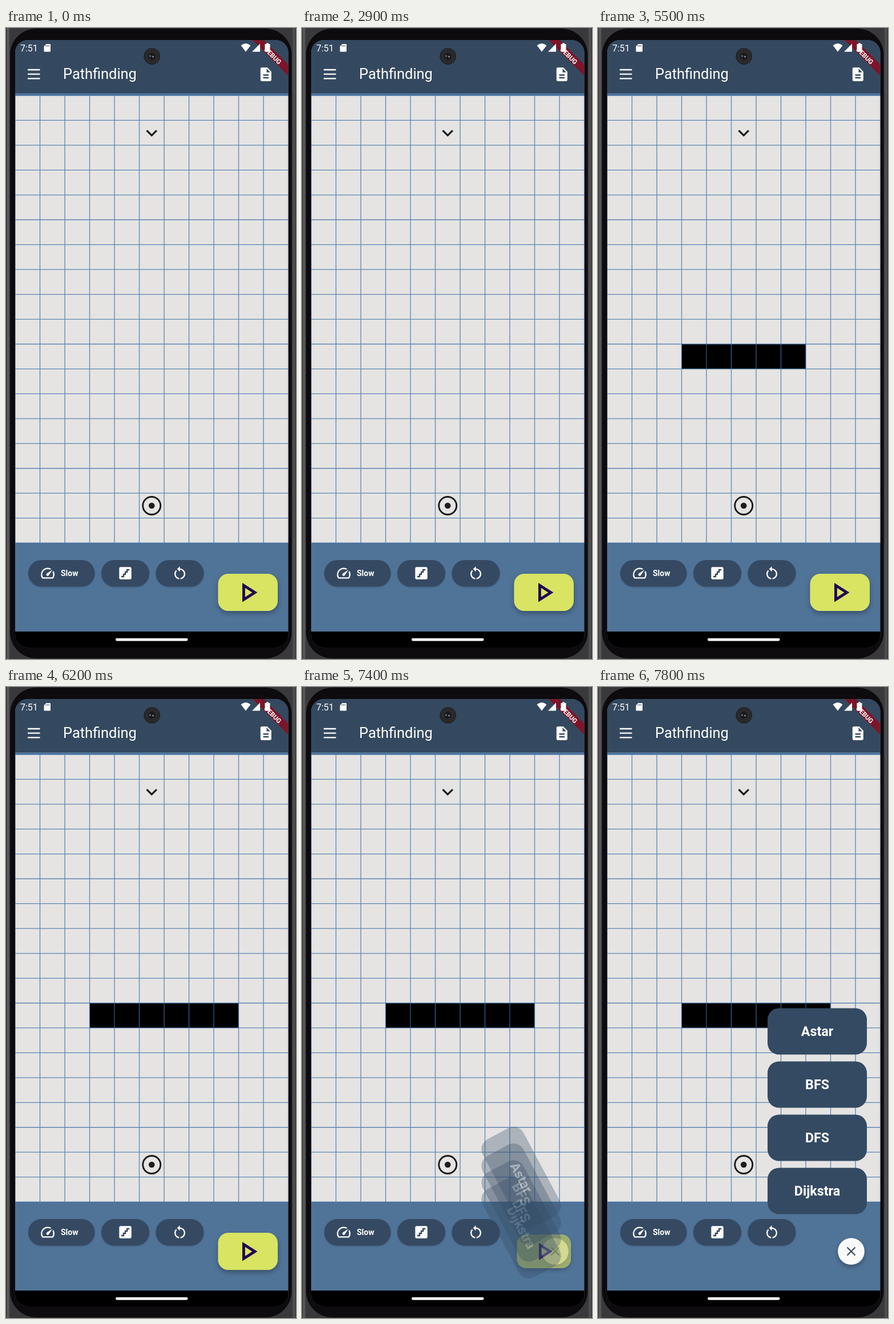
Write an HTML page that moves like this. It is 508 px wide and 1103 px high and loops after 8 s.

```html
<!DOCTYPE html>
<html lang="en">
<head>
<meta charset="utf-8">
<title>Pathfinding</title>
<style>
  html, body { margin: 0; width: 100%; height: 100%; overflow: hidden; background: #0d0b0d; }
  svg { display: block; width: 100%; height: 100%; font-family: Roboto, sans-serif; }
  .pill { fill: #344a62; }
  .bold { font-weight: 700; fill: #fff; }
</style>
</head>
<body>
<svg viewBox="0 0 508 1103">
  <defs>
    <linearGradient id="edge">
      <stop offset="0" stop-color="#2c2c2e"/>
      <stop offset=".006" stop-color="#636365"/>
      <stop offset=".014" stop-color="#39393b"/>
      <stop offset=".986" stop-color="#39393b"/>
      <stop offset=".994" stop-color="#58585a"/>
      <stop offset="1" stop-color="#2c2c2e"/>
    </linearGradient>
    <filter id="soft" x="-30%" y="-30%" width="160%" height="180%">
      <feDropShadow dx="0" dy="4" stdDeviation="4" flood-color="#000" flood-opacity=".3"/>
    </filter>
    <filter id="low" x="-20%" y="-20%" width="140%" height="150%">
      <feDropShadow dx="0" dy="1" stdDeviation="1" flood-color="#000" flood-opacity=".25"/>
    </filter>
    <clipPath id="screen"><rect x="16" y="21" width="478.5" height="1062" rx="22"/></clipPath>
  </defs>

  <rect width="508" height="1103" fill="url(#edge)"/>
  <rect x="7" y="1" width="493.5" height="1101" rx="46" fill="#0d0b0d"/>

  <g clip-path="url(#screen)">
    <rect x="16" y="21" width="479" height="1062" fill="#507398"/>
    <rect x="16" y="21" width="479" height="92.5" fill="#34495f"/>
    <rect x="16" y="112.5" width="479" height="1.5" fill="#2f4560"/>
    <rect x="16" y="118" width="479" height="782" fill="#e5e4e3"/>
    <g id="walls"></g>
    <path id="grid" fill="none" stroke="#3c6ea5" stroke-opacity=".8" stroke-width="1.3"/>
    <rect x="16" y="1055" width="479" height="28"/>
    <path d="M432 21h19.500L494.500 64v19.500z" fill="#7c1529"/>
    <text class="bold" font-size="11.500" text-anchor="middle" transform="translate(467.500 48.500) rotate(45)" y="4">DEBUG</text>
  </g>
  <rect x="192" y="1066.800" width="126.500" height="4.600" rx="2.300" fill="#fff"/>

  <g fill="#fff">
    <text x="25" y="41" font-size="16">7:51</text>
    <path d="M70.500 28H77q1 0 1 1V40.500q0 1-1 1H67.500q-1 0-1-1V32z"/>
    <path d="M411.500 30.500q8.500-7 17 0L420 41.500zM431 41.500L445 27.500V41.500z"/>
    <path d="M456 26.500h4v1.500h2.500v13.500h-9V28h2.500z"/>
    <path d="M38 73h21.500M38 80.700h21.500M38 88.400h21.500" stroke="#fff" stroke-width="2.300"/>
    <text x="100" y="89" font-size="25.400">Pathfinding</text>
  </g>
  <path d="M70 29.800v3M72.600 29.800v3M75.200 29.800v3" stroke="#34495f"/>

  <circle cx="255.700" cy="49.500" r="14" fill="#29292b" stroke="#1b1c20"/>
  <circle cx="255.700" cy="49.500" r="6" fill="#17181b"/>
  <circle cx="252.500" cy="49" r="1.700" fill="#62666c"/>
  <circle cx="257.500" cy="50" r="1.600" fill="#8a8e94"/>

  <circle cx="255.200" cy="835" r="15.500" fill="none" stroke="#1b1b1b" stroke-width="2.900"/>
  <circle cx="255.200" cy="835" r="5.300" fill="#1b1b1b"/>

  <g filter="url(#low)">
    <rect class="pill" x="39" y="930" width="116.500" height="46.500" rx="23"/>
    <rect class="pill" x="167" y="930" width="84" height="46.500" rx="23"/>
    <rect class="pill" x="262.500" y="930" width="84" height="46.500" rx="23"/>
  </g>
  <text class="bold" x="96" y="958" font-size="14">Slow</text>
  <g id="icons"></g>

  <g id="close" filter="url(#soft)">
    <circle cx="443.500" cy="986.500" r="23.300" fill="#fafafa"/>
    <path d="M436.500 979.500l14 14m0-14l-14 14" stroke="#34495f" stroke-width="2.200"/>
  </g>
  <g id="fab">
    <rect x="371.500" y="954" width="104.500" height="65" rx="18" fill="#d9e462" filter="url(#soft)"/>
    <rect id="press" x="371.500" y="954" width="104.500" height="65" rx="18" fill="#30305c"/>
    <path d="M10 8.640L15.270 12 10 15.360V8.640M8 5v14l11-7L8 5z" fill="#1f0053" transform="translate(394.800 958) scale(2.400)"/>
  </g>
  <g id="menu"></g>
</svg>
<script>
const LOOP = 8000, STEP = 100;
const LEFT = 16, TOP = 118, COLS = 11, ROWS = 18, CW = 43.5, CH = 43.45;
const WALL_ROW = 10, WALL_COL = 3;
const WALL_TIMES = [3100, 3700, 4300, 4900, 5500, 6200];
const OPEN_AT = 7330, OPEN_MS = 250, GAP = 93;

const $ = id => document.getElementById(id);
function add(parent, tag, attrs, text = '') {
  const el = document.createElementNS('http://www.w3.org/2000/svg', tag);
  for (const key in attrs) el.setAttribute(key, attrs[key]);
  el.textContent = text;
  return parent.appendChild(el);
}
const show = (el, on) => el.setAttribute('visibility', on ? 'visible' : 'hidden');

let lines = '';
for (let c = 0; c <= COLS; c++) lines += `M${LEFT + c * CW} ${TOP}v${ROWS * CH}`;
for (let r = 0; r <= ROWS; r++) lines += `M${LEFT} ${TOP + r * CH}h${COLS * CW}`;
$('grid').setAttribute('d', lines);

const walls = WALL_TIMES.map((_, i) => add($('walls'), 'rect', {
  x: LEFT + (WALL_COL + i) * CW, y: TOP + WALL_ROW * CH, width: CW, height: CH
}));

// 24-unit icons placed by their centre
function icon(x, y, scale, fill, d) {
  add($('icons'), 'path', { d, fill, transform: `translate(${x} ${y}) scale(${scale}) translate(-12 -12)` });
}
icon(455.3, 81, 1.19, '#fff', 'M14 2H6c-1.1 0-2 .9-2 2v16c0 1.1.9 2 2 2h12c1.1 0 2-.9 2-2V8l-6-6zm2 16H8v-2h8v2zm0-4H8v-2h8v2zm-3-5V3.500L18.500 9H13z');
icon(255.2, 183.5, 1.64, '#1b1b1b', 'M16.590 8.590L12 13.170 7.410 8.590 6 10l6 6 6-6z');
icon(73, 953, 1.19, '#fff', 'M20.380 8.570l-1.230 1.850a8 8 0 0 1-.220 7.580H5.070A8 8 0 0 1 15.580 6.850l1.850-1.230A10 10 0 0 0 3.350 19a2 2 0 0 0 1.720 1h13.850a2 2 0 0 0 1.740-1 10 10 0 0 0-.270-10.440zm-9.790 6.840a2 2 0 0 0 2.830 0l5.660-8.490-8.490 5.660a2 2 0 0 0 0 2.830z');
icon(209, 953, 1.19, '#fff', 'M19 3H5c-1.100 0-2 .9-2 2v14c0 1.100.9 2 2 2h14c1.100 0 2-.9 2-2V5c0-1.100-.9-2-2-2zm-1 5h-2.420v3.330H13v3.330h-2.580V18H6v-2h2.420v-3.330H11V9.330h2.580V6H18z');
icon(304.5, 953, 1.19, '#fff', 'M12 5V2L8 6l4 4V7c3.310 0 6 2.690 6 6 0 2.970-2.170 5.430-5 5.910v2.020c3.950-.490 7-3.850 7-7.930 0-4.420-3.580-8-8-8zM6 13c0-1.650.670-3.150 1.760-4.240L6.340 7.340A8 8 0 0 0 4 13c0 4.080 3.050 7.440 7 7.930v-2.020c-2.830-.480-5-2.940-5-5.910z');

const items = ['Dijkstra', 'DFS', 'BFS', 'Astar'].map(label => {
  const g = add($('menu'), 'g', {});
  add(g, 'rect', { x: -87, y: -40.5, width: 174, height: 81, rx: 20, class: 'pill' });
  add(g, 'text', { y: 8, 'font-size': 23.3, 'text-anchor': 'middle', class: 'bold' }, label);
  return g;
});

// cubic-bezier(.4, 0, .2, 1)
function ease(x) {
  if (x <= 0) return 0;
  if (x >= 1) return 1;
  let lo = 0, hi = 1;
  for (let i = 0; i < 24; i++) {
    const s = (lo + hi) / 2, u = 1 - s;
    if (1.2 * u * u * s + 0.6 * u * s * s + s ** 3 < x) lo = s; else hi = s;
  }
  return 3 * lo * lo - 2 * lo ** 3;
}

function render(t) {
  walls.forEach((wall, i) => show(wall, t >= WALL_TIMES[i]));

  const p = ease((t - OPEN_AT) / OPEN_MS);
  $('press').setAttribute('opacity', t < 7200 ? 0 : t < 7300 ? 0.07 : 0.14);
  const scale = 1 - 0.3 * p;
  $('fab').setAttribute('opacity', 1 - p);
  $('fab').setAttribute('transform', `translate(423.75 986.5) scale(${scale}) translate(-423.75 -986.5)`);
  show($('close'), p > 0);

  items.forEach((item, i) => {
    const y = 974 - GAP * (i + 1) * p;
    item.setAttribute('transform', `translate(384 ${y}) rotate(${90 * (1 - p)})`);
    item.setAttribute('opacity', p);
  });
}

const start = performance.now();
function tick() {
  const t = (performance.now() - start) % LOOP;
  render(Math.floor(t / STEP) * STEP);
  requestAnimationFrame(tick);
}
tick();
</script>
</body>
</html>
```
